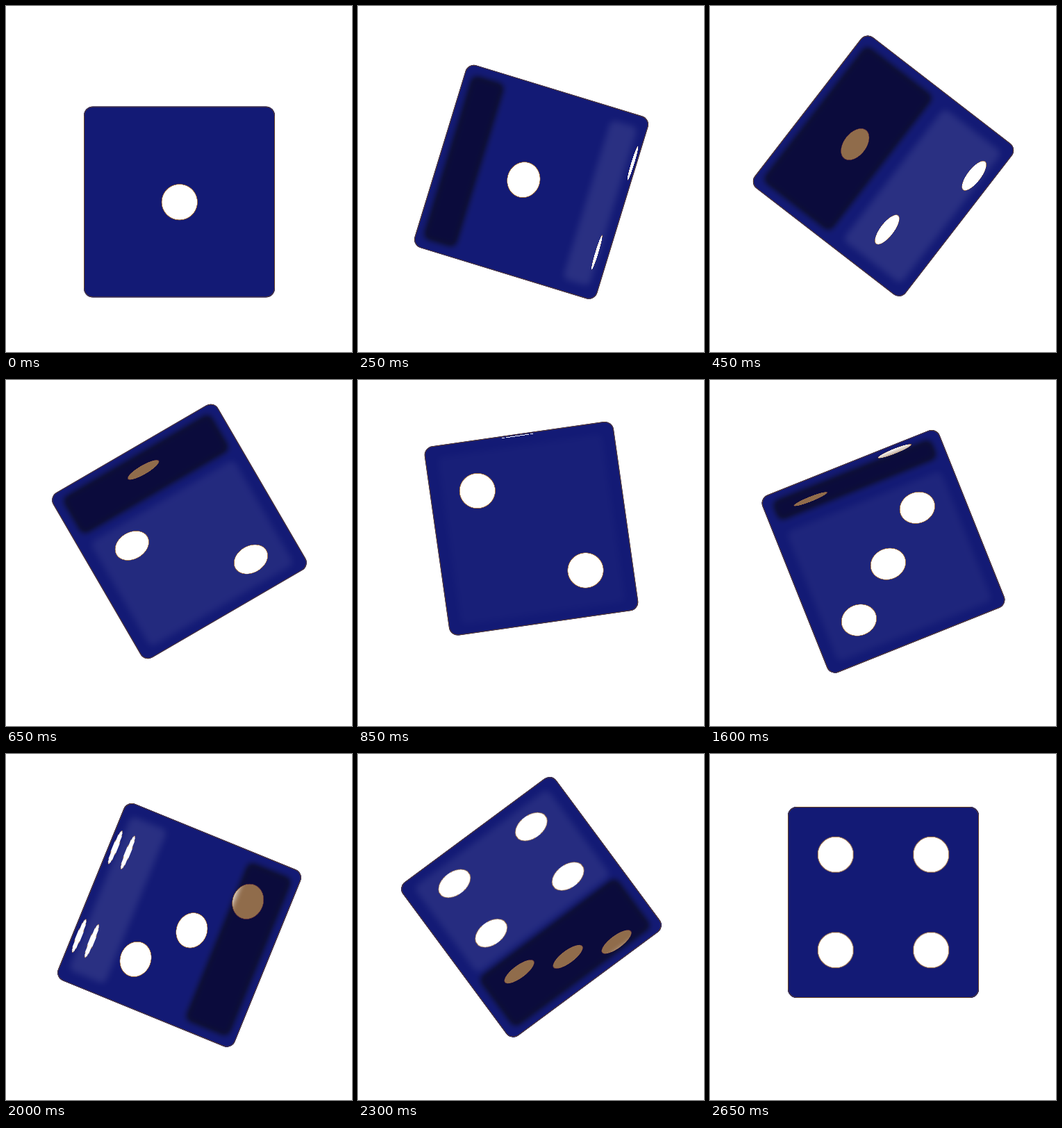
These frames come from a looping animation (498 px wide and 498 px high, 2700 ms). An HTML page without scripts:

```html
<!DOCTYPE html>
<html lang="en">
<head>
<meta charset="utf-8">
<title>Rolling die</title>
<style>
@property --turn { syntax: "<number>"; inherits: true; initial-value: 0; }

html, body { margin: 0; width: 100%; height: 100%; overflow: hidden; background: #fff; }

.die {
  --blue: #131a75;
  --rim: #6b4521;
  --sine: sin(var(--turn) * 1deg);
  --swing: max(var(--sine), -1 * var(--sine));
  --drop: calc(68.5px * (1 - var(--swing)) * (1 - .61 * var(--swing)));
  position: absolute;
  left: 112px;
  top: 76px;
  width: 275px;
  height: 275px;
  border-radius: 13px;
  overflow: hidden;
  background: var(--blue);
  transform: translateY(var(--drop)) rotate(calc(var(--turn) * 1deg));
  animation: roll 2700ms -3ms infinite;
}
.die::after {
  content: "";
  position: absolute;
  inset: 0;
  border: 1px solid var(--rim);
  border-radius: inherit;
}

/* Each roll replaces one face by the next during a quarter turn. */
.roll {
  --a: clamp(0, var(--turn) - var(--from), 90);
  --cos: cos(var(--a) * 1deg);
  --sin: sin(var(--a) * 1deg);
  position: absolute;
  inset: 0;
  isolation: isolate;
  background: var(--blue);
  opacity: calc((var(--turn) - var(--from)) * 1000 + 1);
}
.first { --from: 0; }
.second { --from: 90; transform: rotate(-90deg); }
.third { --from: 180; transform: scaleY(-1); }

.face {
  --pip: radial-gradient(circle, #fff 25px, #a5723c 25.4px 25.8px, transparent 26.4px);
  position: absolute;
  inset: 0;
  background: var(--pip) no-repeat center / 50% 50%;
}
.out { transform-origin: left; transform: scaleX(calc(var(--cos) * var(--cos))); }
.in { transform-origin: right; transform: scaleX(calc(var(--sin) * var(--sin))); }
.two { background-image: var(--pip), var(--pip); background-position: 0 0, 100% 100%; }
.two.rising { background-position: 0 100%, 100% 0; }
.three { background-image: var(--pip), var(--pip), var(--pip); background-position: 0 0, center, 100% 100%; }
.four { background-position: 0 0; background-repeat: repeat; }

.shade, .tint, .light { position: absolute; border-radius: 8px; }
.shade, .tint {
  --reach: min(3.55px * var(--a), 3px + 274px * var(--cos) * var(--cos));
  left: 12px;
  top: 15px;
  bottom: 15px;
  width: max(0px, var(--reach) - 12px);
  filter: blur(4px);
}
.shade { background: #906c4b; mix-blend-mode: multiply; }
.tint { background: #00003c; mix-blend-mode: lighten; }
.light {
  right: 14px;
  top: 18px;
  bottom: 18px;
  width: max(0px, 3.15px * var(--a) - 14px);
  background: #fff;
  opacity: min(.095, .13 * var(--cos));
  filter: blur(5px);
}

/* Quarter turns at a nearly even pace, one pose every 50 ms. */
@keyframes roll {
  0% { --turn: 0; animation-timing-function: steps(2); }
  3.7037% { --turn: 1.5; animation-timing-function: steps(7); }
  16.6667% { --turn: 37.7; animation-timing-function: steps(8); }
  31.4815% { --turn: 81.9; animation-timing-function: steps(8); }
  46.2963% { --turn: 123.2; animation-timing-function: steps(7); }
  59.2593% { --turn: 158.2; animation-timing-function: steps(8); }
  74.0741% { --turn: 202.2; animation-timing-function: steps(13); }
  98.1481%, 100% { --turn: 270; }
}
</style>
</head>
<body>
<div class="die">
  <div class="roll first">
    <div class="face one out"></div>
    <div class="face two rising in"></div>
    <div class="shade"></div><div class="tint"></div><div class="light"></div>
  </div>
  <div class="roll second">
    <div class="face two out"></div>
    <div class="face three in"></div>
    <div class="shade"></div><div class="tint"></div><div class="light"></div>
  </div>
  <div class="roll third">
    <div class="face three out"></div>
    <div class="face four in"></div>
    <div class="shade"></div><div class="tint"></div><div class="light"></div>
  </div>
</div>
</body>
</html>
```
